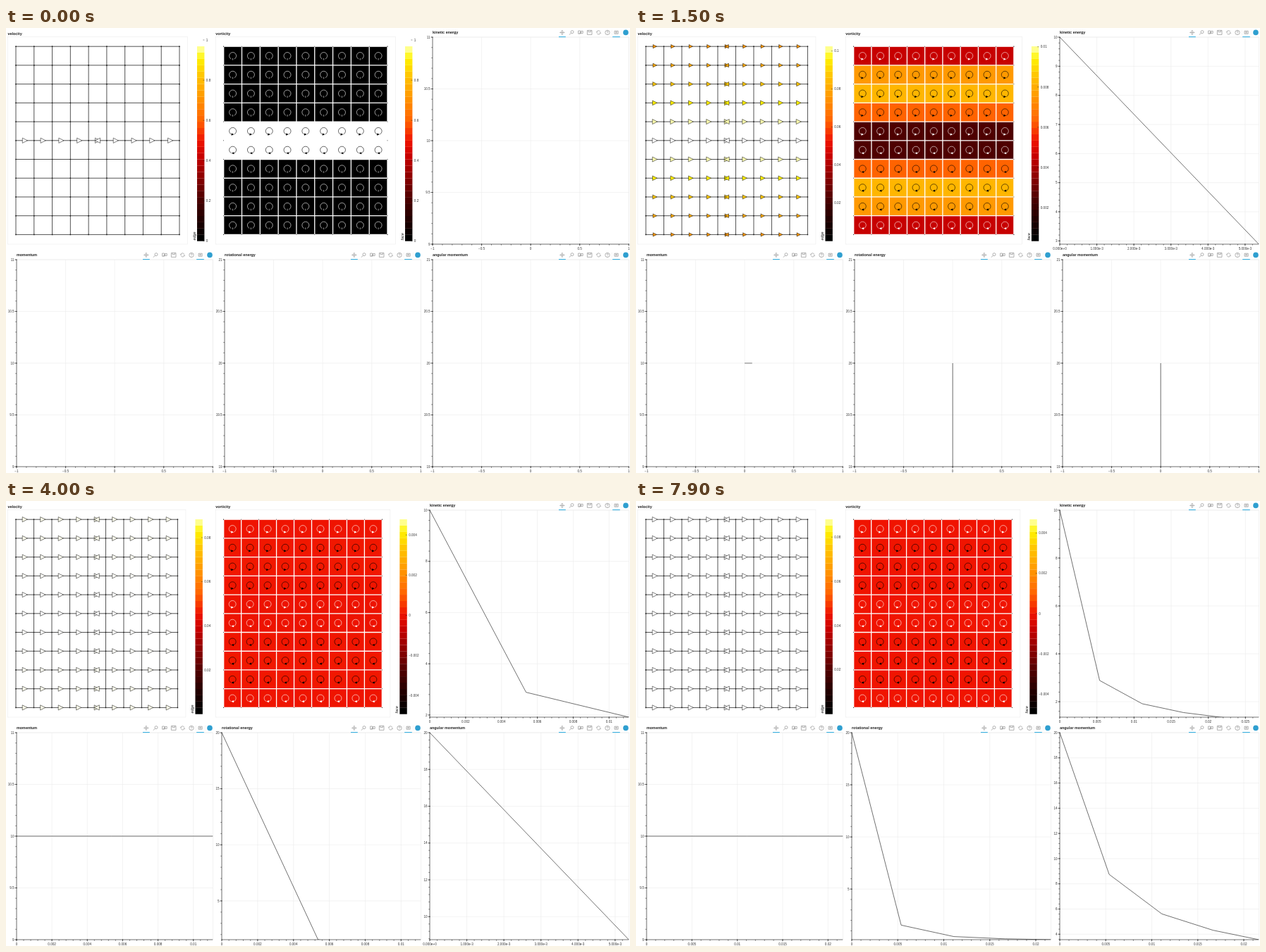
These frames come from a looping animation (885x632 px, 8000 ms). An HTML page:

```html
<!DOCTYPE html>
<html lang="en">
<head>
<meta charset="utf-8">
<title>Shear flow diffusion</title>
<style>
html, body { margin: 0; width: 100%; height: 100%; overflow: hidden; background: #fff; }
svg { display: block; }
text { font: 4.65px "Liberation Sans", Arial, sans-serif; fill: #333; }
.title { font-weight: bold; font-size: 5.42px; fill: #222; }
.name { font-style: italic; font-size: 5.4px; fill: #111; }
</style>
</head>
<body>
<svg id="stage" width="885" height="632" viewBox="0 0 885 632"></svg>
<script>
const STEP = 100, STEPS = 80;
const TOP = 26.2, ROW = 26.72, COLS = 9, ROWS = 10;
const BAR_TOP = 17, BAR_END = 302.6;
const stage = document.getElementById('stage');
const f = n => +n.toFixed(2);

// ---- model: one jet diffusing over eleven rows ----
const firstTimes = [0, .00537, .0111, .01665, .02163, .0268];
const timeAt = k => k < 6 ? firstTimes[k] : .0268 + (k - 5) * .0049;
const spread = k => 104 * timeAt(k);

function speed(d, s) {
  let sum = 1;
  for (let j = 1; j <= 5; j++) {
    const decay = Math.exp(-4 * Math.sin(Math.PI * j / 11) ** 2 * s);
    sum += 2 * decay * Math.cos(2 * Math.PI * j * d / 11);
  }
  return sum / 11;
}
const kinetic = k => 10 * speed(0, 2 * spread(k));
const momentum = () => 10;
const rotational = k => 20 * (speed(0, 2 * spread(k)) - speed(1, 2 * spread(k)));
const angular = k => 20 * (speed(0, spread(k)) - speed(5, spread(k)));

// ---- colours ----
const fireStops = [
  [0, 0, 0, 0], [.12, 42, 0, 0], [.2, 76, 0, 0], [.3, 132, 0, 0], [.42, 200, 0, 0],
  [.5, 240, 20, 0], [.6, 255, 98, 0], [.73, 255, 154, 0], [.83, 255, 196, 0],
  [.92, 255, 242, 0], [.96, 255, 255, 112], [1, 255, 255, 255]
];
function fire(v) {
  v = Math.min(1, Math.max(0, v));
  const i = Math.max(1, fireStops.findIndex(s => s[0] >= v));
  const a = fireStops[i - 1], b = fireStops[i], t = (v - a[0]) / (b[0] - a[0]);
  return `rgb(${[1, 2, 3].map(c => Math.round(a[c] + (b[c] - a[c]) * t))})`;
}

// ---- ticks ----
function tickStep(range) {
  const base = Math.floor(Math.log10(range / 6));
  let best = 0, error = Infinity;
  for (const e of [base, base + 1]) for (const m of [1, 2, 5]) {
    const step = m * 10 ** e, miss = Math.abs(6 - range / step);
    if (miss < error) { best = step; error = miss; }
  }
  return best;
}
function multiples(lo, hi, step) {
  const list = [];
  for (let i = Math.ceil(lo / step - 1e-6); i <= hi / step + 1e-6; i++) list.push(i * step);
  return list;
}
function labels(ticks) {
  const small = ticks.some(t => Math.abs(t) > 1e-9 && Math.abs(t) < .001001);
  return ticks.map(t => (small ? t.toExponential(3) : String(+t.toFixed(6))).replace(/^-/, '−'));
}

// ---- drawing helpers ----
const rect = (x, y, w, h, fill, more = '') =>
  `<rect x="${f(x)}" y="${f(y)}" width="${f(w)}" height="${f(h)}" fill="${fill}" ${more}/>`;
const path = (d, stroke, width, fill = 'none') =>
  `<path d="${d}" stroke="${stroke}" stroke-width="${width}" fill="${fill}"/>`;
const text = (x, y, s, more = '') => `<text x="${f(x)}" y="${f(y)}" ${more}>${s}</text>`;
const hline = (x1, x2, y) => `M${f(x1)} ${f(y)}H${f(x2)}`;
const vline = (x, y1, y2) => `M${f(x)} ${f(y1)}V${f(y2)}`;
const dot = (x, y) => `M${f(x)} ${f(y)}h0`;
const dots = (d, size) =>
  `<path d="${d}" stroke="#222" stroke-width="${size}" stroke-linecap="round"/>`;

const frameBox = (x, right) => rect(x, 12.6, right - x, 294.4, 'none', 'stroke="#e8e8e8" stroke-width=".5"');

function colorScale(lo, hi, open) {
  const ticks = multiples(lo, hi, tickStep(hi - lo)).filter(t => !open || t > lo + 1e-9);
  const names = labels(ticks);
  return { lo, hi, ticks, names, inset: 2.55 * (Math.max(...names.map(n => n.length)) - 3) };
}

function colorBar(x, scale, name) {
  const bands = 32, h = (BAR_END - BAR_TOP) / bands;
  let out = '';
  for (let i = 0; i < bands; i++)
    out += rect(x, BAR_END - (i + 1) * h, 10.4, h + .1, fire(i / (bands - 1)));
  scale.ticks.forEach((t, i) => {
    const y = BAR_END - (t - scale.lo) / (scale.hi - scale.lo) * (BAR_END - BAR_TOP);
    out += path(hline(x + 8.4, x + 10.4, y), '#000', .4);
    out += text(x + 12.8, y + 1.7, scale.names[i]);
  });
  const lx = f(x - 2);
  return out + text(lx, 301.5, name, `class="name" transform="rotate(-90 ${lx} 301.5)"`);
}

// ---- velocity panel ----
function triangle(x, y, r, dir, fill) {
  return path(`M${f(x - dir * r)} ${f(y - r)}L${f(x + dir * r)} ${f(y)}L${f(x - dir * r)} ${f(y + r)}Z`, '#000', .5, fill);
}
function velocityPanel(k) {
  const s = spread(k), peak = speed(0, s);
  const scale = colorScale(0, peak, k > 0);
  const left = 14, right = 246 - scale.inset, w = (right - left) / COLS;
  let grid = '', nodes = '', arrows = '';
  for (let i = 0; i <= COLS; i++) grid += vline(left + i * w, TOP, TOP + ROWS * ROW);
  for (let j = 0; j <= ROWS; j++) {
    const y = TOP + j * ROW, v = Math.max(0, speed(Math.abs(j - 5), s) / peak);
    grid += hline(left, right, y);
    for (let i = 0; i <= COLS; i++) nodes += dot(left + i * w, y);
    if (v < .01) continue;
    for (let i = 0; i < COLS; i++) {
      const x = left + (i + .5) * w;
      arrows += triangle(x, y, 3.6 * v, 1, fire(v));
      if (i === 4) arrows += triangle(x, y, 3.6 * v, -1, fire(v));
    }
  }
  return frameBox(2.5, right + 11.5) + text(2.5, 9.6, 'velocity', 'class="title"') +
    path(grid, '#1a1a1a', .75) + dots(nodes, 1.7) + arrows + colorBar(271 - scale.inset, scale, 'edge');
}

// ---- vorticity panel ----
function swirl(x, y, dir, moving, ink) {
  const ring = path(`M${f(x - 2.2)} ${f(y + 4.5)}A5 5 0 1 1 ${f(x + 2.2)} ${f(y + 4.5)}`, ink, .6);
  if (!moving) return ring + path(vline(x, y + 3.4, y + 6), ink, .6);
  return ring + `<path d="M${f(x - dir * 1.9)} ${f(y + 3)}l${dir * 3.8} 1.6l${-dir * 3.8} 1.6Z" fill="${ink}"/>`;
}
function vorticityPanel(k) {
  const s = spread(k), curl = [];
  for (let r = 0; r < 5; r++) curl.push(speed(4 - r, s) - speed(5 - r, s));
  let lo = Math.min(...curl), hi = Math.max(...curl);
  const mid = (lo + hi) / 2;
  if (hi - lo < .01) { lo = mid - .005; hi = mid + .005; }
  if (k === 0) { lo = 0; hi = 1; }
  const scale = colorScale(lo, hi);
  const left = 308.7, right = 541 - scale.inset, w = (right - left) / COLS;
  let cells = '', marks = '', gaps = '', nodes = '';
  for (let r = 0; r < ROWS; r++) {
    const value = curl[r < 5 ? r : 9 - r], y = TOP + r * ROW;
    const v = (value - lo) / (hi - lo);
    cells += rect(left, y, right - left, ROW, fire(v));
    for (let i = 0; i < COLS; i++)
      marks += swirl(left + (i + .5) * w, y + ROW / 2, r < 5 ? 1 : -1, value > 1e-9, value < mid ? '#fff' : '#000');
  }
  for (let j = 0; j <= ROWS; j++) {
    const y = TOP + j * ROW;
    gaps += hline(left, right, y);
    nodes += dot(left - .3, y) + dot(right, y);
  }
  for (let i = 0; i <= COLS; i++) {
    const x = left + i * w;
    gaps += vline(x, TOP, TOP + ROWS * ROW);
    nodes += dot(x, TOP) + dot(x, TOP + ROWS * ROW);
  }
  return frameBox(297.5, right + 11.5) + text(297.2, 9.6, 'vorticity', 'class="title"') +
    cells + path(gaps, '#fff', 1.3) + dots(nodes, 1) + marks + colorBar(566 - scale.inset, scale, 'face');
}

// ---- line charts; axes catch up with the data only at these steps ----
const charts = [
  { title: 'kinetic energy', x: 605, y: 13, at: kinetic, mid: 10, xs: [9, 35, 55, 66, 79], ys: [12, 37, 56, 67] },
  { title: 'momentum', x: 15, y: 329, at: momentum, mid: 10, xs: [16, 39, 57, 68], ys: [] },
  { title: 'rotational energy', x: 310, y: 329, at: rotational, mid: 20, xs: [19, 40, 58, 69], ys: [21, 42, 59, 70] },
  { title: 'angular momentum', x: 605, y: 329, at: angular, mid: 20, xs: [24, 44, 60, 71], ys: [27, 46, 65, 72] }
];
const passed = (list, k) => list.filter(n => n <= k).length;

function toolbar(x, y) {
  const g = '#8a8a8a';
  const icons =
    'M-3 0H3M0 -3V3M-1 -2L0 -3L1 -2M-1 2L0 3L1 2M-2 -1L-3 0L-2 1M2 -1L3 0L2 1' +
    'M12.2 -.8a2 2 0 1 1 4 0a2 2 0 1 1 -4 0M12.8 .7L10 3.2' +
    'M22.8 -2.4h3v4.2h-3zM26.8 -2h2.6v3h-2.6zM24 .8h3' +
    'M35.6 -3h6.6v6h-6.6zM37.2 -3v2.2h3.4v-2.2' +
    'M49 -.8a2.7 2.7 0 0 1 5 -.3M54.3 .8a2.7 2.7 0 0 1 -5 .3M48.4 -1.2l.7 1.2l1.2 -.6M54.9 1.2l-.7 -1.2l-1.2 .6' +
    'M61 0a3.2 3.2 0 1 1 6.4 0a3.2 3.2 0 1 1 -6.4 0M63.2 -.8c0 -1.5 2.2 -1.3 2 0c-.1 .7 -1 .7 -1 1.5M64.2 1.5v.6' +
    'M74.2 -2.2h5.2v4h-5.2zM75.4 -.8h2.8M75.4 .5h2.8';
  return `<g transform="translate(${x} ${y})">` + path(icons, g, .65) +
    path('M-4.8 6.2H5M71.4 6.2H82', '#26aae1', 1) + path('M70.6 -4V4M83.6 -4V4', '#e8e8e8', .4) +
    '<circle cx="90.2" cy="0" r="3.8" fill="#2f9fd0"/></g>';
}

function chart(c, k) {
  const nx = passed(c.xs, k), ny = passed(c.ys, k);
  const x0 = nx ? 0 : -1, x1 = nx ? timeAt(nx) : 1;
  const y0 = ny ? c.at(ny) : c.mid - 1, y1 = ny ? c.mid : c.mid + 1;
  const left = ny ? c.x - 4 : c.x, right = c.x + 278.3, top = c.y, base = c.y + 294;
  const px = v => left + (v - x0) / (x1 - x0) * (right - left);
  const py = v => base - (v - y0) / (y1 - y0) * (base - top);
  const sx = tickStep(x1 - x0), sy = tickStep(y1 - y0);
  const tx = multiples(x0, x1, sx), ty = multiples(y0, y1, sy);
  const lx = labels(tx), ly = labels(ty);
  let grid = '', axis = vline(left, top, base) + hline(left, right, base), names = '';
  tx.forEach((t, i) => {
    grid += vline(px(t), top, base);
    axis += vline(px(t), base - .9, base + 2.4);
    names += text(px(t), base + 7.8, lx[i], 'text-anchor="middle"');
  });
  ty.forEach((t, i) => {
    grid += hline(left, right, py(t));
    axis += hline(left - 2.4, left + .9, py(t));
    names += text(left - 3.3, py(t) + 1.7, ly[i], 'text-anchor="end"');
  });
  for (const t of multiples(x0, x1, sx / 5)) axis += vline(px(t), base, base + 1.6);
  for (const t of multiples(y0, y1, sy / 5)) axis += hline(left - 1.6, left, py(t));
  let line = '';
  for (let i = 0; i <= k; i++)
    line += (i ? 'L' : 'M') + f(px(timeAt(i)) - left) + ' ' + f(py(c.at(i)) - top);
  return path(grid, '#e6e6e6', .5) +
    rect(left, top, right - left, base - top, 'none', 'stroke="#e6e6e6" stroke-width=".5"') +
    `<svg x="${left}" y="${top}" width="${f(right - left)}" height="294" overflow="hidden">` +
    (k ? path(line, '#222', .65) : '') + '</svg>' +
    path(axis, '#222', .6) + names +
    text(left, top - 4.6, c.title, 'class="title"') + toolbar(c.x + 183.8, top - 6.6);
}

// ---- loop ----
let shown = -1;
function draw(now) {
  const k = Math.floor(now / STEP) % STEPS;
  if (k !== shown) {
    shown = k;
    stage.innerHTML = rect(0, 0, 885, 632, '#fff') + velocityPanel(k) + vorticityPanel(k) +
      charts.map(c => chart(c, k)).join('');
  }
}
const start = performance.now();
function tick() {
  draw(performance.now() - start);
  requestAnimationFrame(tick);
}
tick();
</script>
</body>
</html>
```
